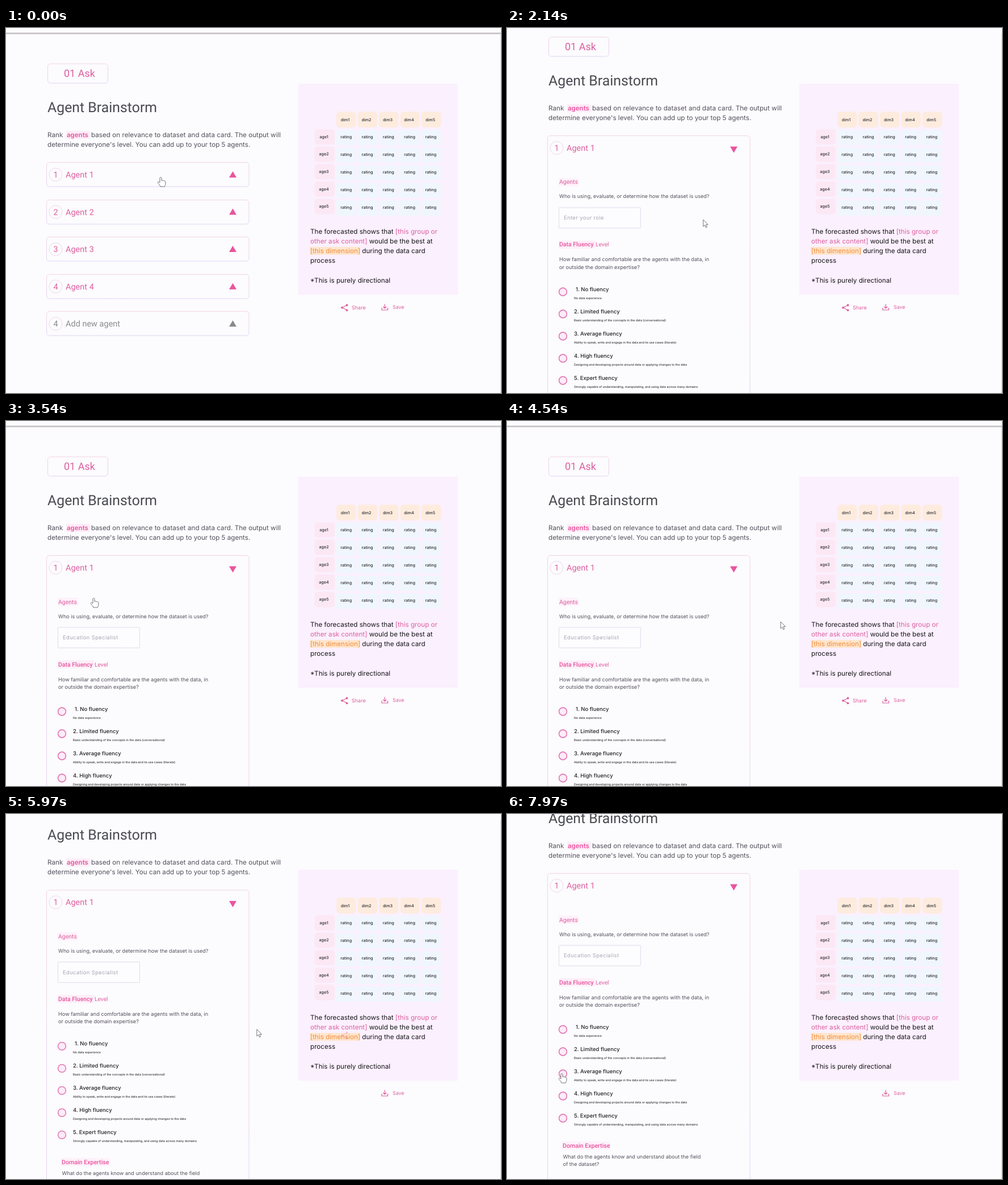
An HTML page for the animation above (8000 ms loop, 872 px wide and 642 px high).

```html
<!DOCTYPE html>
<html lang="en">
<head>
<meta charset="utf-8">
<title>Agent Brainstorm</title>
<style>
  html, body { margin: 0; width: 100%; height: 100%; overflow: hidden; background: #fcfbfe; }
  svg { display: block; width: 872px; height: 642px; }
  text { font-family: Inter, "Open Sans", sans-serif; white-space: pre; text-rendering: geometricPrecision; }
  .r { font-family: Roboto, sans-serif; }
</style>
</head>
<body>
<svg id="stage" viewBox="0 0 872 642" xmlns="http://www.w3.org/2000/svg"></svg>
<script>
const LOOP = 8000, OPEN_AT = 500, FILL_AT = 3500;
const PINK = '#dc609f', HOT = '#e8559f', GREY = '#8a8a8d', INK = '#55525c', BLUSH = '#fce8f5';

const rect = (x, y, w, h, fill, rx = 0, more = '') =>
  `<rect x="${x}" y="${y}" width="${w}" height="${h}" rx="${rx}" fill="${fill}" ${more}/>`;
const text = (x, y, size, fill, s, more = '') =>
  `<text x="${x}" y="${y}" font-size="${size}" fill="${fill}" ${more}>${s}</text>`;
const roboto = (x, y, size, fill, s, weight = 400) =>
  text(x, y, size, fill, s, `class="r" font-weight="${weight}"`);
const outline = (x, y, w, h) => rect(x, y, w, h, 'none', 5, 'stroke="url(#edge)"');

// Number badge, title and arrow of an agent row
function rowHead(y, num, label, color, open) {
  const arrow = open ? `M393 ${y + 18.5}h13l-6.5 11z` : `M393 ${y + 26}h13l-6.5 -11z`;
  return `<circle cx="87.5" cy="${y + 21}" r="11.5" fill="none" stroke="#efd8e9"/>` +
    text(87.5, y + 26, 14.5, color, num, 'class="r" text-anchor="middle"') +
    roboto(105, y + 26, 14.5, color, label) +
    `<path d="${arrow}" fill="${color === GREY ? GREY : HOT}"/>`;
}

function closedRows() {
  const rows = [[1, 'Agent 1'], [2, 'Agent 2'], [3, 'Agent 3'], [4, 'Agent 4'], [4, 'Add new agent']];
  return rows.map(([n, label], i) => {
    const y = 237 + i * 65.55;
    return outline(71.5, Math.round(y) - .5, 356.5, 42.5) + rowHead(y, n, label, i < 4 ? PINK : GREY, false);
  }).join('');
}

function openRow() {
  const levels = [
    ['No fluency', 'No data experience'],
    ['Limited fluency', 'Basic understanding of the concepts in the data (conversational)'],
    ['Average fluency', 'Ability to speak, write and engage in the data and its use cases (literate)'],
    ['High fluency', 'Designing and developing projects around data or applying changes to the data'],
    ['Expert fluency', 'Strongly capable of understanding, manipulating, and using data across many domains']
  ];
  const radios = levels.map(([name, note], i) => {
    const y = 511 + i * 39;
    return `<circle cx="98.5" cy="${y}" r="6.9" fill="#fcebf8" stroke="#e278b3" stroke-width="1.6"/>` +
      text(i ? 118 : 121, y - .9, 9.5, '#222', `${i + 1}. ${name}`, 'font-weight="500"') +
      text(118, y + 12.8, 5.25, '#333', note, 'font-weight="500"');
  }).join('');
  return outline(71.5, 236.5, 356.5, 700) + rowHead(237, 1, 'Agent 1', PINK, true) +
    rect(91, 311, 35, 14, '#fdf1fa') + roboto(92, 321.5, 10.5, PINK, 'Agents') +
    text(92, 346.5, 9.05, INK, 'Who is using, evaluate, or determine how the dataset is used?') +
    rect(91.5, 363, 144, 36, '#fdfcff', 1, 'stroke="#dfdcea"') +
    text(100, 384.3, 9.4, '#a9a6b2', '', 'id="role" letter-spacing=".4"') +
    rect(91, 421, 64, 14, '#fdeef8') + roboto(92, 431.5, 10.5, HOT, 'Data Fluency', 500) +
    roboto(156, 431.5, 10.2, PINK, 'Level') +
    text(92, 457.5, 9.2, INK, 'How familiar and comfortable are the agents with the data, in') +
    text(92, 470.8, 9.2, INK, 'or outside the domain expertise?') + radios +
    rect(97, 708, 85, 14, '#fdf1fa') + roboto(98, 718.5, 10.6, HOT, 'Domain Expertise', 500) +
    text(98.5, 738, 9.05, INK, 'What do the agents know and understand about the field') +
    text(98.5, 751.3, 9.05, INK, 'of the dataset?');
}

function panel() {
  const label = (x, y, s) => text(x, y, 7.2, '#2b2b2e', s, 'text-anchor="middle" font-weight="500"');
  let out = rect(515, 98, 281, 371, '#fbf0fe');
  for (let c = 0; c < 5; c++) {
    const x = 582 + c * 37.5;
    out += rect(x, 147, 34.5, 28, '#fdecde', 6) + label(x + 15.5, 163.6, 'dim' + (c + 1));
  }
  for (let r = 0; r < 5; r++) {
    const y = 178 + r * 30.6;
    out += rect(544, y, 35, 27, BLUSH, 5) + label(560, y + 15.8, 'age' + (r + 1));
    for (let c = 0; c < 5; c++) {
      const x = 582 + c * 37.3, top = 179 + r * 31;
      out += rect(x, top, 34.5, 27, '#f0f6fd', 2) + label(x + 17.2, top + 15.4, 'rating');
    }
  }
  const line = (y, s) => text(536, y, 11.65, '#17171a', s);
  const tint = (color, s) => `<tspan fill="${color}">${s}</tspan>`;
  return out + rect(535, 385, 89, 14, '#fee6cf') +
    line(361.5, 'The forecasted shows that ' + tint(PINK, '[this group or')) +
    line(378.7, tint(PINK, 'other ask content]') + ' would be the best at') +
    line(396, tint('#f28c3a', '[this dimension]') + ' during the data card') +
    line(413.2, 'process') + line(447.5, '*This is purely directional') +
    `<path d="M662 492v4h10.5v-4M667.2 485.5v7M664.2 490l3 3 3-3" fill="none" stroke="${PINK}" stroke-width="1.2"/>` +
    text(681, 494.3, 8.8, PINK, 'Save');
}

const share = `<g id="share"><path d="M601 487.5l-9 4.3 9 4.5" fill="none" stroke="${PINK}" stroke-width="1.2"/>` +
  [[600.5, 487.5], [592, 491.8], [600.5, 496.3]].map(([x, y]) =>
    `<circle cx="${x}" cy="${y}" r="1.9" fill="${PINK}"/>`).join('') +
  text(609, 495, 9, PINK, 'Share', 'id="shareWord"') + '</g>';

const hand = 'M-2 2V-6c0-2 3-2 3 0v4.5c1-1 2.5-.8 2.8.4 1-.8 2.3-.5 2.5.7 1-.4 1.7.2 1.7 1.2V4c0 2-1 3-1.5 5H-1C-2 6-4 4.5-5.5 2.5-6.5 1-4.5-.5-3.2.8z';
const arrow = 'M0 0V12l2.8-2.5 1.9 4.3 2-.9-1.9-4.2H8.5z';

const stage = document.getElementById('stage');
stage.innerHTML =
  `<defs><linearGradient id="edge" x1="0" y1="0" x2="0" y2="1">
    <stop offset="0" stop-color="#f2d5e3"/><stop offset="1" stop-color="#e0d6f0"/></linearGradient></defs>` +
  rect(0, 0, 872, 642, '#fcfbfe') +
  '<g id="page">' +
    rect(0, 8, 872, 3, '#cbc9cb') + outline(73.5, 63, 106, 34) +
    roboto(102, 86, 18, PINK, '01 Ask') +
    roboto(73, 148, 24.85, '#4a4b52', 'Agent Brainstorm') +
    rect(106, 181, 41, 14, '#fdecf7') + text(73, 192, 11.7, INK, 'Rank') +
    text(107, 192, 11.5, HOT, 'agents', 'font-weight="600"') +
    text(150, 192, 11.7, INK, 'based on relevance to dataset and data card. The output will') +
    text(73, 209, 11.65, INK, 'determine everyone\'s level. You can add up to your top 5 agents.') +
    `<g id="closed">${closedRows()}</g><g id="open">${openRow()}</g>` +
  '</g>' + panel() + share + rect(871, 10, 1, 632, '#dddce0') +
  '<g id="cursor" fill="#fff" stroke="#65636b" stroke-width=".9" stroke-linejoin="round">' +
    `<path id="hand" d="${hand}"/><path id="arrow" d="${arrow}"/></g>`;

const el = {};
stage.querySelectorAll('[id]').forEach(n => el[n.id] = n);

const scrollKeys = [[1800, 0], [2350, -69.5], [FILL_AT, -69.5], [FILL_AT, 0],
  [5200, 0], [5540, -46], [6250, -132]];
const cursorKeys = [[0, 273, 270], [800, 273, 270], [1400, 460, 348], [1850, 460, 348],
  [2550, 155, 319], [4200, 155, 319], [4540, 482, 353], [4760, 560, 430], [5100, 465, 376],
  [5540, 454, 371], [6100, 440, 380], [6610, 200, 414], [7300, 97, 464]];

// Eased value of every column at time t
function sample(keys, t) {
  const i = keys.findIndex(k => k[0] > t);
  if (i < 1) return keys[i < 0 ? keys.length - 1 : 0].slice(1);
  const a = keys[i - 1], b = keys[i];
  const u = (t - a[0]) / (b[0] - a[0]), e = u * u * (3 - 2 * u);
  return a.slice(1).map((v, j) => v + (b[j + 1] - v) * e);
}

const show = (node, on) => node.setAttribute('visibility', on ? 'visible' : 'hidden');
const move = (node, x, y) => node.setAttribute('transform', `translate(${x} ${y})`);

function draw(t) {
  const [scroll] = sample(scrollKeys, t), [x, y] = sample(cursorKeys, t);
  const opened = t >= OPEN_AT, filled = t >= FILL_AT;
  move(el.page, 0, scroll);
  show(el.closed, !opened);
  show(el.open, opened);
  el.role.textContent = filled ? 'Education Specialist' : 'Enter your role';

  // After the role is filled in, Share scrolls with the page and slips behind the panel
  const shift = filled ? scroll : 0, covered = shift < -22;
  move(el.share, 0, shift);
  el.share.setAttribute('opacity', covered ? .3 : 1);
  show(el.shareWord, !covered);

  const pointing = t < 850 || (t > 2450 && t < 4230) || t > 7200;
  move(el.cursor, x, y);
  show(el.hand, pointing);
  show(el.arrow, !pointing);
}

const start = performance.now();
function tick() {
  draw((performance.now() - start) % LOOP);
  requestAnimationFrame(tick);
}
tick();
</script>
</body>
</html>
```
